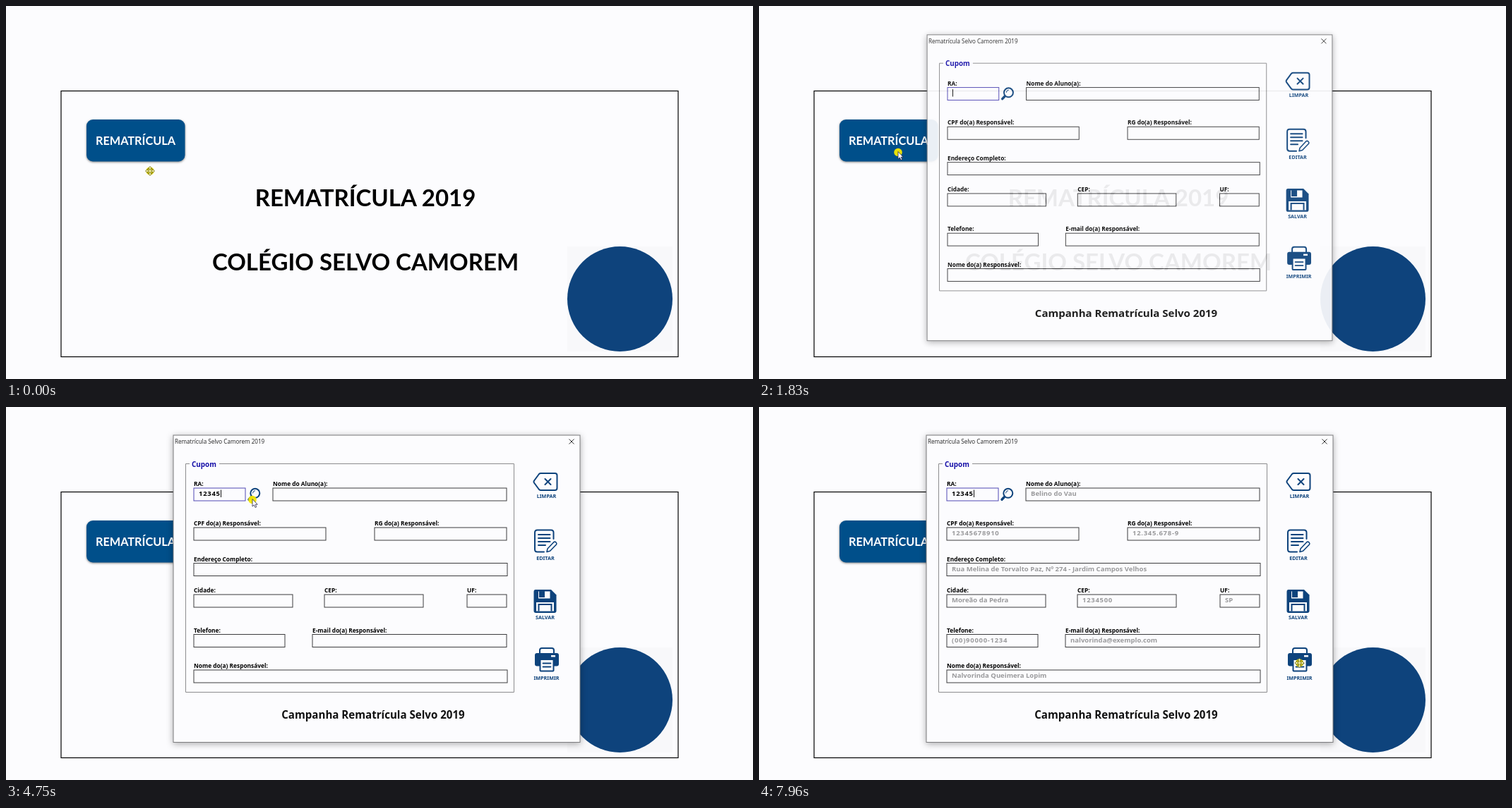
Write an HTML page that moves like this. It is 1058 by 529 pixels and loops after 8 s.

```html
<!DOCTYPE html>
<html lang="pt-BR">
<head>
<meta charset="utf-8">
<title>Rematrícula</title>
<style>
  html, body { margin: 0; width: 100%; height: 100%; overflow: hidden; background: #fcfcfe; }
  svg { display: block; width: 1058px; height: 529px; }
  text { white-space: pre; }
  .slide { font: bold 33px Lato, sans-serif; text-anchor: middle; }
  .button { font-size: 16.3px; fill: #fff; }
  .title { font: 8.1px "Open Sans", sans-serif; fill: #222; }
  .label, .value, .legend, .tag, .foot { font: bold 8.35px "Noto Sans", sans-serif; }
  .value { font-size: 9.5px; fill: #9a9a9c; }
  .digits { letter-spacing: .7px; }
  .typed { fill: #000; }
  .legend { font-size: 9.9px; fill: #1710a8; }
  .tag { font-size: 7.2px; fill: #0e437c; text-anchor: middle; }
  .foot { font-size: 15.1px; text-anchor: middle; fill: #111; }
  .field { fill: none; stroke: #3c3c3e; }
  .icon { fill: none; stroke: #0e437c; stroke-width: 2; stroke-linejoin: round; stroke-linecap: round; }
  .solid { fill: #0e437c; stroke: none; }
  .paper { fill: #fcfcfe; }
</style>
</head>
<body>
<svg id="stage" viewBox="0 0 1058 529">
  <rect x="795" y="341" width="149" height="149" fill="#f8f8fa"/>
  <circle cx="869.5" cy="415.5" r="74.5" fill="#0e437c"/>
  <rect x="78" y="120.5" width="874" height="377" fill="none" stroke="#000" stroke-width="1.2"/>
  <rect x="114" y="161" width="139.5" height="59.5" rx="9" fill="#004f8a"
        style="filter:drop-shadow(0 1.5px 1.5px rgba(0,0,0,.5))"/>
  <text class="slide button" x="183.5" y="197">REMATRÍCULA</text>
  <text class="slide" x="509" y="284">REMATRÍCULA 2019</text>
  <text class="slide" x="509" y="375">COLÉGIO SELVO CAMOREM</text>

  <g id="dialog">
    <rect x="237" y="40" width="576" height="435.5" fill="#fcfcfe" stroke="#7c7c7e"
          style="filter:drop-shadow(0 2px 5px rgba(0,0,0,.32))"/>
    <text class="title" x="239" y="52">Rematrícula Selvo Camorem 2019</text>
    <path d="M797.5 45.5l7 7m0-7l-7 7" stroke="#333"/>
    <path d="M260 80.5H254.5V404.5H719.5V80.5H302" fill="none" stroke="#8c8c8e"/>
    <text class="legend" x="263" y="84.5">Cupom</text>
    <g id="fields"></g>
    <text id="typed" class="value digits typed" x="273" y="126.3"></text>
    <path id="caret" d="M0 117.5v10.5" stroke="#111"/>
    <text class="foot" x="520" y="442">Campanha Rematrícula Selvo 2019</text>

    <g class="icon">
      <circle cx="352.8" cy="122.3" r="6.5"/>
      <path d="M349.5 122a3.6 3.6 0 0 1 3.2-3.4" stroke-width="1"/>
      <path d="M347.3 127.8l-3.3 3.4" stroke-width="3.4"/>

      <path d="M757.5 94H777.5Q780.5 94 780.5 97V115Q780.5 118 777.5 118H757.5Q756 118 755 117L748 107.5Q747 106 748 104.5L755 95Q756 94 757.5 94z"/>
      <path d="M763.5 102l8 8m0-8l-8 8"/>

      <path d="M775.5 187V178Q775.5 174.5 772 174.5H752.5Q749 174.5 749 178V202Q749 205.5 752.5 205.5H762"/>
      <path d="M754 181H770.5M754 186H770.5M754 191H770.5M754 196H764"/>
      <path d="M766 205.5l1-4.5 9-9.5q1.5-1 3 .5t.5 3l-9 9.3z" stroke-width="1.6"/>

      <path class="solid" d="M750 259H772L779.500 266.500V289Q779.500 292 776.500 292H750.500Q747.500 292 747.500 289V262Q747.500 259 750 259z"/>
      <path class="solid paper" d="M754 261.500H770.500V271.500H754zM751 277H776V289.500H751z"/>
      <path class="solid" d="M755 261h8v9h-8zM753.500 279h20v10.500h-20z"/>
      <path class="solid paper" d="M755.500 281h16v8.500h-16z"/>

      <path d="M756 351V345Q756 342 759 342H773Q776 342 776 345V351"/>
      <rect class="solid" x="749" y="349" width="34" height="18.500" rx="3"/>
      <rect class="solid paper" x="772" y="352" width="6" height="2.500"/>
      <rect class="paper" x="756.500" y="358" width="19" height="16.500" rx="1"/>
      <path d="M760.500 363.500h11M760.500 368.500h11" stroke-width="1.800"/>
    </g>
    <text class="tag" x="765.5" y="129">LIMPAR</text>
    <text class="tag" x="764" y="216.7">EDITAR</text>
    <text class="tag" x="763.5" y="301">SALVAR</text>
    <text class="tag" x="765.5" y="386.5">IMPRIMIR</text>
  </g>

  <g id="cursor">
    <circle r="5.8" fill="#f6e800" opacity=".95"/>
    <path id="arrow" d="M0 -1V9.500L2.400 7.400 4 11 5.800 10.200 4.200 6.700H7.200z" fill="#fff" stroke="#26264a" stroke-width=".8"/>
    <path id="move" d="M0-6.500L2.800-3.500H1V-1H3.500V-2.800L6.500 0 3.500 2.800V1H1V3.500H2.800L0 6.500-2.800 3.500H-1V1H-3.500V2.800L-6.500 0-3.500-2.800V-1H-1V-3.500H-2.800z" fill="#fdf9a0" stroke="#5c5a20" stroke-width=".8"/>
  </g>
</svg>
<script>
const LOOP = 8000, OPEN = 1680, FILL = 5700;
const KEYS = [2650, 2940, 3190, 3420, 3650];
const $ = id => document.getElementById(id);

// label, x, y, right edge, value
const FIELDS = [
  ['RA:', 266, 115, 339, ''],
  ['Nome do Aluno(a):', 378, 115, 709, 'Belino do Vau'],
  ['CPF do(a) Responsável:', 266, 171, 453, '12345678910'],
  ['RG do(a) Responsável:', 522, 171, 709, '12.345.678-9'],
  ['Endereço Completo:', 266, 221.5, 710, 'Rua Melina de Torvalto Paz, Nº 274 - Jardim Campos Velhos'],
  ['Cidade:', 266, 266, 406, 'Moreão da Pedra'],
  ['CEP:', 451, 266, 591, '1234500'],
  ['UF:', 653, 266, 709, 'SP'],
  ['Telefone:', 266, 322.5, 395, '(00)90000-1234'],
  ['E-mail do(a) Responsável:', 434, 322.5, 709, 'nalvorinda@exemplo.com'],
  ['Nome do(a) Responsável:', 266, 373, 710, 'Nalvorinda Queimera Lopim']
];

$('fields').innerHTML = FIELDS.map(([label, x, y, right, value], i) => {
  const kind = /^[\d(]/.test(value) ? 'value digits' : 'value';
  const ink = i ? '' : ' style="stroke:#5148b4"';
  return `<text class="label" x="${x}" y="${y - 3}">${label}</text>
    <rect class="field" x="${x}" y="${y}" width="${right - x}" height="18"${ink}/>
    <text class="${kind} loaded" x="${x + 7}" y="${y + 11.3}">${value}</text>`;
}).join('');
const loaded = document.querySelectorAll('.loaded');

// time, x, y
const POINTER = [
  [0, 204, 234], [130, 204, 234], [850, 197, 207.5], [4150, 197, 207.5],
  [4700, 349, 131.5], [5150, 349, 131.5], [5450, 352, 126],
  [6400, 352, 126], [7500, 765.5, 363], [LOOP, 765.5, 363]
];
// time, scale, opacity
const WINDOW = [[0, .95, 0], [OPEN, .95, 0], [1750, .979, .56], [1800, .992, .85], [1860, 1, 1], [LOOP, 1, 1]];

const smooth = u => u * u * (3 - 2 * u);
const linear = u => u;

function sample(track, t, ease) {
  const i = track.findIndex(step => step[0] > t);
  const a = track[i - 1], b = track[i];
  const u = ease((t - a[0]) / (b[0] - a[0]));
  return [1, 2].map(k => a[k] + (b[k] - a[k]) * u);
}

const show = (el, on) => el.style.visibility = on ? 'visible' : 'hidden';

function draw(t) {
  const [scale, alpha] = sample(WINDOW, t, linear);
  const dialog = $('dialog');
  dialog.setAttribute('transform', `translate(525 257.7) scale(${scale}) translate(-525 -257.7)`);
  dialog.setAttribute('opacity', alpha);

  const count = KEYS.filter(k => k <= t).length;
  $('typed').textContent = '12345'.slice(0, count);
  const since = t - (count ? KEYS[count - 1] : OPEN);
  $('caret').setAttribute('transform', `translate(${273.5 + count * 6.2} 0)`);
  show($('caret'), since >= 0 && since % 1060 < 530);
  loaded.forEach(el => show(el, t >= FILL));

  const [x, y] = sample(POINTER, t, smooth);
  $('cursor').setAttribute('transform', `translate(${x} ${y})`);
  $('cursor').style.display = t >= KEYS[0] && t < 4150 ? 'none' : '';
  $('arrow').style.display = y > 221 ? 'none' : '';
  $('move').style.display = y > 221 ? '' : 'none';
}

const start = performance.now();
function tick() {
  draw((performance.now() - start) % LOOP);
  requestAnimationFrame(tick);
}
tick();
</script>
</body>
</html>
```
